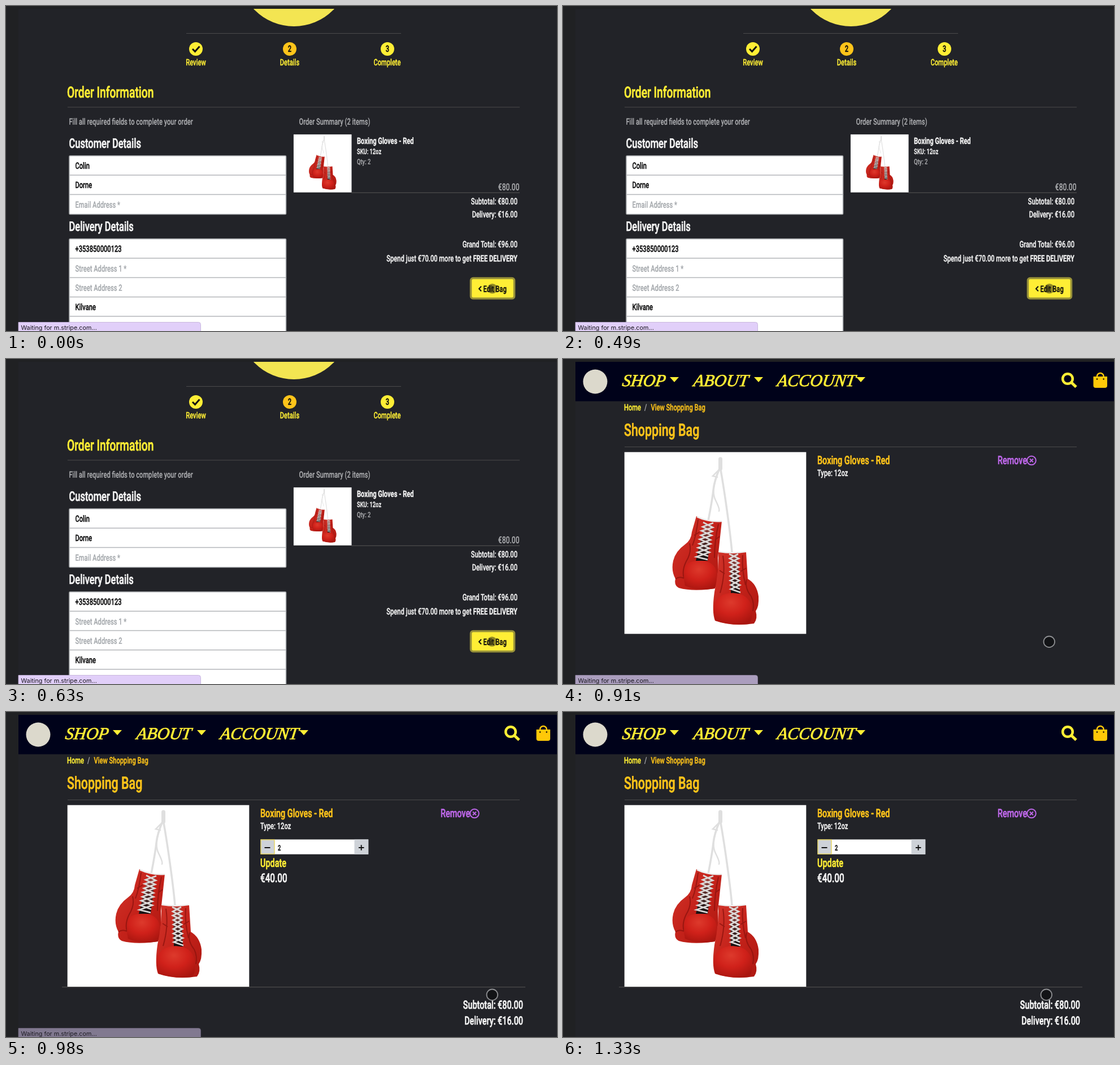
Write an HTML page that moves like this. It is 975 by 575 pixels and loops after 1.4 s.

```html
<!DOCTYPE html>
<html lang="en">
<head>
<meta charset="utf-8">
<title>Checkout to shopping bag</title>
<style>
html, body { margin: 0; width: 100%; height: 100%; overflow: hidden; background: #202123; }
svg { display: block; width: 975px; height: 575px; color: #f5f5f5; }

/* condensed display face, one ratio for every label */
.t {
  font-family: Roboto, "Liberation Sans", sans-serif;
  font-weight: 500;
  font-size: 15.7px;
  fill: currentColor;
  stroke: currentColor;
  stroke-width: .4;
  text-rendering: geometricPrecision;
  transform: translate(var(--x), var(--y)) scale(.71, 1);
}
.mid { text-anchor: middle; }
.end { text-anchor: end; }
.bold { font-weight: 600; }
.s13 { font-size: 13.2px; }
.s17 { font-size: 17px; }
.s20 { font-size: 20.3px; }
.s23 { font-size: 23.3px; }
.s27 { font-size: 27.1px; }
.s30 { font-size: 30.2px; }
.s20, .s23, .s27, .s30 { stroke-width: .7; }
.yellow { color: #ffee35; }
.amber { color: #ffc41a; }
.ink { color: #0b0b0c; }
.grey { color: #adaeb1; }
.hint { color: #a3a7ab; }
.grey, .hint { stroke-width: .2; }
.violet { color: #bb66e6; }
.dot { fill: currentColor; }
.nav {
  font: italic 30px "Liberation Serif", "Noto Serif", serif;
  fill: #ffee35; stroke: #ffee35; stroke-width: .9;
  transform: translate(var(--x), 48px) skewX(-8deg);
}
.status { font: 10.8px Inter, "Open Sans", sans-serif; fill: #17131c; }
.rule { stroke: #4b4b4b; stroke-width: 1.2; }
.split { stroke: #b4b6ba; stroke-width: 1.6; }
.field { fill: #fff; stroke: #a9abae; stroke-width: 1.6; }

.checkout, .bag, .totals, .bar, .press, .pointer { animation: 1400ms step-end infinite; }
.checkout { animation-name: leave; }
.bag { animation-name: enter; }
.totals { animation-name: fill-in; }
.bar { animation-name: fade; }
.press { animation-name: nudge; }
.pointer { animation-name: drift; }
@keyframes leave { 0% { visibility: visible; } 65%, 100% { visibility: hidden; } }
@keyframes enter { 0% { visibility: hidden; } 65%, 100% { visibility: visible; } }
@keyframes fill-in { 0% { visibility: hidden; } 70%, 100% { visibility: visible; } }
@keyframes fade {
  0% { opacity: 1; } 65% { opacity: .72; } 70% { opacity: .5; }
  75% { opacity: .24; } 80%, 100% { opacity: 0; }
}
@keyframes nudge { 0% { transform: translateX(.6px); } 45%, 100% { transform: none; } }
@keyframes drift { 0% { transform: none; } 95%, 100% { transform: translateX(-5px); } }
</style>
</head>
<body>
<svg viewBox="0 0 975 575">
  <defs>
    <clipPath id="page"><rect x="22" y="5" width="953" height="570"/></clipPath>
    <linearGradient id="leather" x2="1" y2="1">
      <stop stop-color="#d2352b"/><stop offset=".5" stop-color="#c4221a"/><stop offset="1" stop-color="#ad1811"/>
    </linearGradient>
    <radialGradient id="fist" cx=".45" cy=".3" r=".75">
      <stop stop-color="#dd3a2c"/><stop offset=".5" stop-color="#d0211a"/><stop offset="1" stop-color="#a8150f"/>
    </radialGradient>
    <linearGradient id="gap" x2="0" y2="1">
      <stop stop-color="#a5423a"/><stop offset=".5" stop-color="#4a2523"/><stop offset="1" stop-color="#131112"/>
    </linearGradient>
    <g id="gloves">
      <rect x="108.700" y="164.700" width="321.600" height="321.600" fill="#fff"/>
      <g fill="none" stroke="#dfdfdf" stroke-linecap="round">
        <path stroke-width="7" d="M278.500 177V194"/>
        <path stroke-width="3.500" d="M277 194Q268 214 266 232T257 286M279 196Q285 230 291 274T299 342"/>
        <path stroke-width="2.500" d="M276 196L265 207L273 209M272 208Q262 234 270 250T276 269"/>
      </g>
      <path fill="url(#leather)" d="M236 278Q258 290 281 287L274 352Q276 385 269 406Q230 412 205 405Q196 400 199 389Q191 375 195 357Q199 340 216 328Q227 320 228 306Z"/>
      <path fill="none" stroke="#8f130e" stroke-width="2" stroke-opacity=".8" d="M224 326Q228 342 218 358Q210 374 214 388M199 389Q206 384 214 388M239 284Q236 312 229 330M275 292Q268 322 268 352M232 312L242 306M269 320L277 314"/>
      <path fill="url(#gap)" d="M251 291L264 293L256 357H235Z"/>
      <path fill="none" stroke="#dcd8d7" stroke-width="2.700" d="M248 289L265 298L245 304L263 312L242 319L261 327L239 334L259 342L236 350L256 355M266 290L247 297L264 305L244 312L261 320L241 327L259 335L238 342L257 349"/>
      <path fill="url(#fist)" d="M216 368Q221 356 245 357Q268 358 272 378Q275 398 268 406Q236 411 216 401Q212 384 216 368Z"/>
      <path fill="none" stroke="#eee" stroke-width="2.500" d="M237 279Q258 289 281 287M276 341Q300 345 323 341"/>
      <path fill="url(#leather)" d="M275 342Q300 346 324 342L327 389Q343 398 346 420Q347 438 341 446Q345 459 338 468Q300 474 269 463Q263 448 268 412Q276 375 275 342Z"/>
      <path fill="none" stroke="#8f130e" stroke-width="2" stroke-opacity=".8" d="M325 390Q321 405 333 420Q339 432 336 446M283 348Q288 380 278 414M318 347Q316 372 323 400M277 374L286 380M314 376L324 370"/>
      <path fill="url(#gap)" d="M296 345H309L313 415H297Z"/>
      <path fill="none" stroke="#dcd8d7" stroke-width="2.700" d="M294 345L311 353L295 360L311 368L296 376L312 384L296 392L313 400L297 407L314 413M310 345L295 353L311 361L296 368L311 376L296 384L312 392L297 400L313 407"/>
      <path fill="url(#fist)" d="M267 437Q273 414 301 414Q330 415 334 441Q336 463 329 469Q297 472 270 463Q266 452 267 437Z"/>
    </g>
    <path id="caret" d="M0 0H16L8 9Z" fill="#ffee35"/>
  </defs>

  <rect width="975" height="575" fill="#202123"/>
  <rect x="22" y="5" width="953" height="570" fill="#222328"/>

  <g class="checkout">
    <circle cx="509.500" cy="-62" r="98" fill="#f3e552" clip-path="url(#page)"/>
    <path class="rule" d="M319 48.500H699"/>
    <circle class="dot yellow" cx="336" cy="76" r="12"/>
    <circle class="dot amber" cx="502" cy="76" r="12"/>
    <circle class="dot yellow" cx="675" cy="76" r="12"/>
    <path d="M330 76L334.500 80.500L342.500 71.500" fill="none" stroke="#111" stroke-width="3"/>
    <text class="t mid ink" style="--x:502px;--y:81px">2</text>
    <text class="t mid ink" style="--x:675px;--y:81px">3</text>
    <text class="t mid yellow" style="--x:336px;--y:105px">Review</text>
    <text class="t mid yellow" style="--x:502px;--y:105px">Details</text>
    <text class="t mid yellow" style="--x:674.500px;--y:105px">Complete</text>

    <text class="t s27 yellow" style="--x:108px;--y:161.500px">Order Information</text>
    <path class="rule" d="M109 179H909"/>
    <text class="t grey" style="--x:111.500px;--y:209.500px">Fill all required fields to complete your order</text>
    <text class="t s23" style="--x:111.500px;--y:251px">Customer Details</text>
    <rect class="field" x="112" y="265" width="383.500" height="103.500" rx="1.500"/>
    <path class="split" d="M112 299.300H495M112 333.500H495"/>
    <text class="t ink" style="--x:122.500px;--y:288px">Colin</text>
    <text class="t ink" style="--x:122.500px;--y:322px">Dorne</text>
    <text class="t hint" style="--x:122.500px;--y:356.500px">Email Address *</text>

    <text class="t s23" style="--x:111.500px;--y:398px">Delivery Details</text>
    <rect class="field" x="112" y="412" width="383.500" height="180" rx="1.500"/>
    <path class="split" d="M112 446.300H495M112 480.500H495M112 514.800H495M112 549H495"/>
    <text class="t ink" style="--x:122.500px;--y:435px">+353850000123</text>
    <text class="t hint" style="--x:122.500px;--y:469.500px">Street Address 1 *</text>
    <text class="t hint" style="--x:122.500px;--y:503.500px">Street Address 2</text>
    <text class="t ink" style="--x:122.500px;--y:538px">Kilvane</text>

    <text class="t grey" style="--x:518.500px;--y:209.500px">Order Summary (2 items)</text>
    <use href="#gloves" transform="translate(509 227.300) scale(.319) translate(-109 -165)"/>
    <text class="t bold" style="--x:621px;--y:244px">Boxing Gloves - Red</text>
    <text class="t s13" style="--x:621px;--y:262px">SKU: 12oz</text>
    <text class="t s13 grey" style="--x:621px;--y:280px">Qty: 2</text>
    <text class="t s17 end grey" style="--x:908.500px;--y:325.500px">€80.00</text>
    <path class="rule" d="M611 330.300H909"/>
    <text class="t end" style="--x:905px;--y:351px">Subtotal: €80.00</text>
    <text class="t end" style="--x:905px;--y:374px">Delivery: €16.00</text>
    <text class="t end" style="--x:905px;--y:426.500px">Grand Total: €96.00</text>
    <text class="t end" style="--x:905px;--y:452px">Spend just €70.00 more to get <tspan class="bold">FREE DELIVERY</tspan></text>

    <rect x="822.500" y="481.500" width="77" height="36" rx="4" fill="#ffee35" stroke="#979039" stroke-width="3.500"/>
    <path d="M841 496L837 500.300L841 504.500" fill="none" stroke="#111" stroke-width="2"/>
    <text class="t ink" style="--x:844.500px;--y:505.500px">Edit Bag</text>
    <circle class="press" cx="860" cy="500" r="8.700" fill="#1c1b12" fill-opacity=".48"/>
  </g>

  <g class="bag">
    <rect x="22" y="5" width="953" height="69.700" fill="#00021a"/>
    <circle cx="57" cy="40" r="21.500" fill="#dcd9cc"/>
    <text class="nav" style="--x:104px">SHOP</text>
    <text class="nav" style="--x:230px">ABOUT</text>
    <text class="nav" style="--x:378px">ACCOUNT</text>
    <use href="#caret" x="189" y="32"/>
    <use href="#caret" x="338" y="32"/>
    <use href="#caret" x="519" y="32"/>
    <g fill="none" stroke="#ffee35" stroke-width="4.500">
      <circle cx="893" cy="35" r="8.800"/>
      <path d="M899.500 41.500L908 49.500" stroke-width="5"/>
    </g>
    <path fill="#ffc808" d="M938.500 31H963V47Q963 51 959 51H942.500Q938.500 51 938.500 47Z"/>
    <path fill="none" stroke="#ffc808" stroke-width="2.600" d="M945 33V30.500A5.800 5.500 0 0 1 956.600 30.500V33"/>
    <circle cx="945" cy="35.500" r="1.200"/>
    <circle cx="956.600" cy="35.500" r="1.200"/>

    <text class="t yellow" style="--x:108px;--y:91px">Home</text>
    <text class="t grey" style="--x:144px;--y:91px">/</text>
    <text class="t amber" style="--x:155.500px;--y:91px">View Shopping Bag</text>
    <text class="t s30 amber" style="--x:108px;--y:136px">Shopping Bag</text>
    <path class="rule" d="M109 155.500H909"/>
    <use href="#gloves"/>
    <text class="t s20 amber" style="--x:450px;--y:186px">Boxing Gloves - Red</text>
    <text class="t" style="--x:450px;--y:207px">Type: 12oz</text>
    <text class="t s20 violet" style="--x:769px;--y:186px">Remove</text>
    <g fill="none" stroke="#bb66e6" stroke-width="2">
      <circle cx="829" cy="179.500" r="7.800"/>
      <path d="M826 176.500L832 182.500M832 176.500L826 182.500"/>
    </g>

    <g class="totals">
      <rect x="450.500" y="225.500" width="190.700" height="26.200" fill="#fff"/>
      <rect x="451" y="226" width="24" height="25.200" fill="#ced2d8" stroke="#e8d24a" stroke-width="1.200"/>
      <rect x="616.500" y="225.500" width="24.700" height="26.200" fill="#ced2d8"/>
      <path d="M457.500 240H467.500M624 240H633.500M628.700 235.300V244.700" stroke="#111" stroke-width="1.900"/>
      <text class="t s13 ink" style="--x:481px;--y:244.500px">2</text>
      <text class="t s20 yellow" style="--x:450px;--y:273.500px">Update</text>
      <text class="t s20" style="--x:450px;--y:301px;font-size:21.500px">€40.00</text>
      <path class="rule" d="M99 486.700H919"/>
      <text class="t s20 end" style="--x:915px;--y:525px">Subtotal: €80.00</text>
      <text class="t s20 end" style="--x:915px;--y:553px">Delivery: €16.00</text>
    </g>
    <circle class="pointer" cx="860.300" cy="500.300" r="9.800" fill="#0f1013" fill-opacity=".85" stroke="#8e8f92" stroke-width="1.800"/>
  </g>

  <g class="bar">
    <path d="M22 559.500H340.500Q344.500 559.500 344.500 563.500V576H22Z" fill="#e1cff9" stroke="#bfaed6" stroke-width=".8"/>
    <text class="status" x="26.500" y="573">Waiting for m.stripe.com...</text>
  </g>
</svg>
</body>
</html>
```
